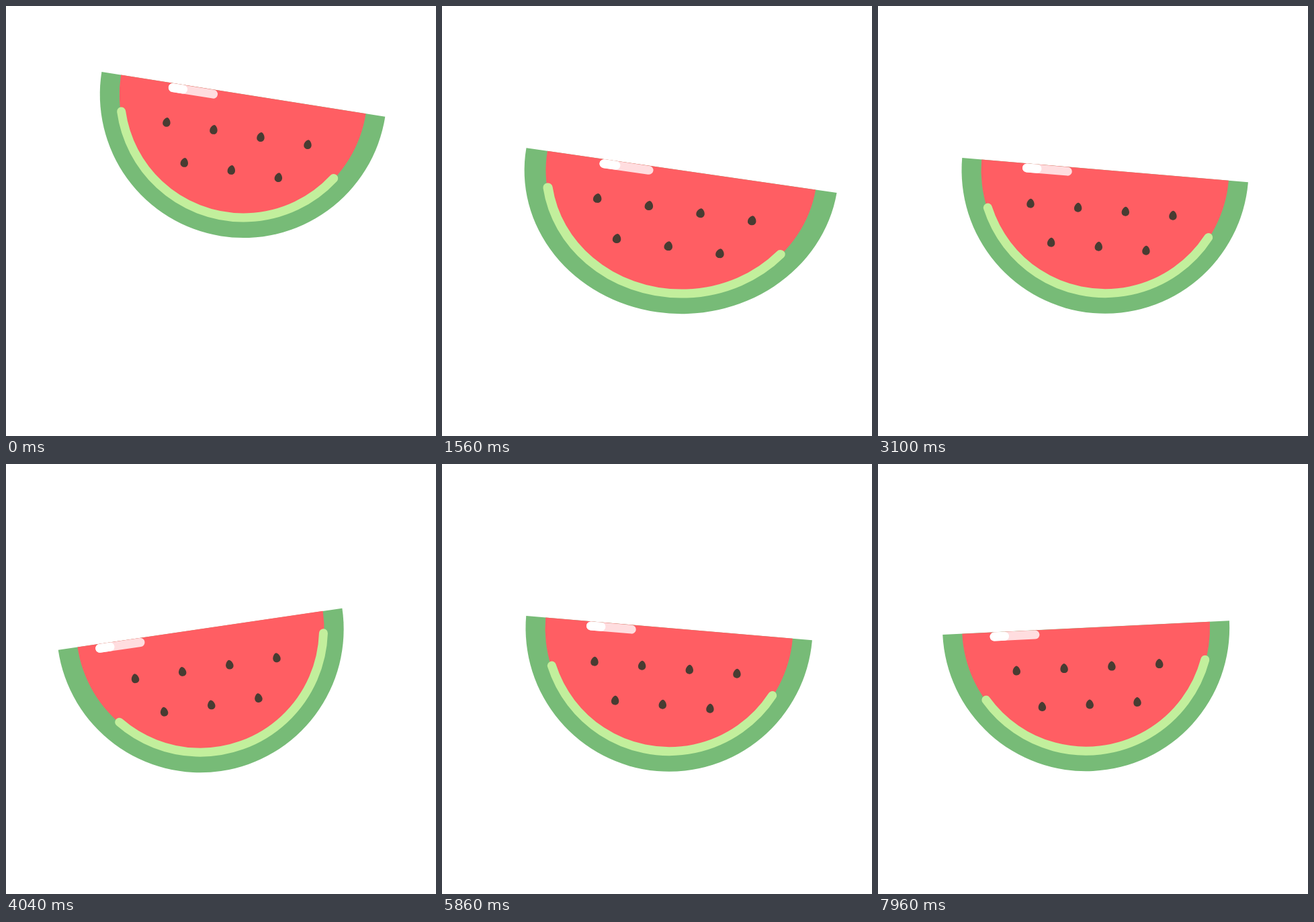
These frames come from a looping animation (640x640 px, 8000 ms). An HTML page with a canvas:

```html
<!DOCTYPE html>
<html lang="en">
<head>
<meta charset="utf-8">
<title>Rocking watermelon</title>
<style>
  html, body { margin: 0; height: 100%; overflow: hidden; background: #fff; }
  canvas { display: block; }
</style>
</head>
<body>
<canvas id="stage" width="640" height="640"></canvas>
<script>
const ctx = document.getElementById('stage').getContext('2d');
const RAD = Math.PI / 180;
const LOOP = 8000, BEAT = 1120, TILT = 9;
// The picture is held in uneven steps, ten to a beat.
const STEPS = [0, 120, 260, 300, 440, 560, 680, 820, 860, 1000];

const stepAt = t =>
  Math.floor(t / BEAT) * 10 + STEPS.filter(s => s <= t % BEAT).length - 1;

// cubic-bezier(.7, 0, .3, 1)
function ease(x) {
  let lo = 0, hi = 1;
  for (let n = 0; n < 30; n++) {
    const s = (lo + hi) / 2, r = 1 - s;
    if (2.1 * r * r * s + 0.9 * r * s * s + s * s * s < x) lo = s; else hi = s;
  }
  return lo * lo * (3 - 2 * lo);
}

function tiltAt(step) {
  if (step < 20) return TILT;
  const swing = Math.floor(step / 20);
  const tilt = TILT * (1 - 2 * ease(step / 20 - swing));
  return swing % 2 ? tilt : -tilt;
}

// A high fall followed by one small hop.
function heightAt(step) {
  const fall = 125.6 - 2.05 * (step - 2.32) ** 2;
  const hop = 32.3 - 2.55 * (step - 17.48) ** 2;
  return Math.max(0, fall, hop);
}

// Widening on landing, then a slow recovery.
function widthAt(step) {
  if (step < 10 || step > 26) return 1;
  const phase = step < 12 ? (12 - step) / 2 : (step - 12) / 14;
  return 1 + 0.05 * (1 + Math.cos(Math.PI * phase));
}

function half(radius, color) {
  ctx.fillStyle = color;
  ctx.beginPath();
  ctx.arc(0, 0, radius, 0, Math.PI);
  ctx.fill();
}

function bar(x, length, color) {
  ctx.strokeStyle = color;
  ctx.beginPath();
  ctx.moveTo(x, 6.7);
  ctx.lineTo(x + length, 6.7);
  ctx.stroke();
}

function seed(x, y) {
  ctx.save();
  ctx.translate(x, y);
  ctx.beginPath();
  ctx.moveTo(0, -7);
  ctx.bezierCurveTo(3, -6.5, 5.7, -2, 5.7, 1.4);
  ctx.bezierCurveTo(5.7, 5, 3.2, 7, 0, 7);
  ctx.bezierCurveTo(-3.2, 7, -5.7, 5, -5.7, 1.4);
  ctx.bezierCurveTo(-5.7, -2, -3, -6.5, 0, -7);
  ctx.fill();
  ctx.restore();
}

function draw(step) {
  const tilt = tiltAt(step);
  ctx.clearRect(0, 0, 640, 640);
  ctx.save();
  ctx.translate(320, 456.6 - heightAt(step));
  ctx.scale(widthAt(step), 1);
  ctx.rotate(tilt * RAD);
  ctx.translate(0, -213.2);

  half(213.6, '#77bb77');
  half(184.5, '#ff5e63');

  ctx.lineWidth = 13;
  ctx.lineCap = 'round';

  // The inner rind and the shine slide against the slice.
  const slide = 1.365 * tilt - 3.8;
  ctx.strokeStyle = '#c2ef9c';
  ctx.beginPath();
  ctx.arc(0, 0, 183.5, (25.45 + slide) * RAD, (154.55 + slide) * RAD);
  ctx.stroke();

  const shine = 2.69 * tilt - 129.5;
  bar(shine, 61, '#ffdddf');
  bar(shine, 15.5, '#fff');

  ctx.fillStyle = '#483c32';
  for (let n = 0; n < 4; n++) seed(70.9 * (n - 1.5), 58.7);
  for (let n = 0; n < 3; n++) seed(70.9 * (n - 1), 113.9);
  ctx.restore();
}

const start = performance.now();
function tick() {
  draw(stepAt((performance.now() - start) % LOOP));
  requestAnimationFrame(tick);
}
tick();
</script>
</body>
</html>
```
